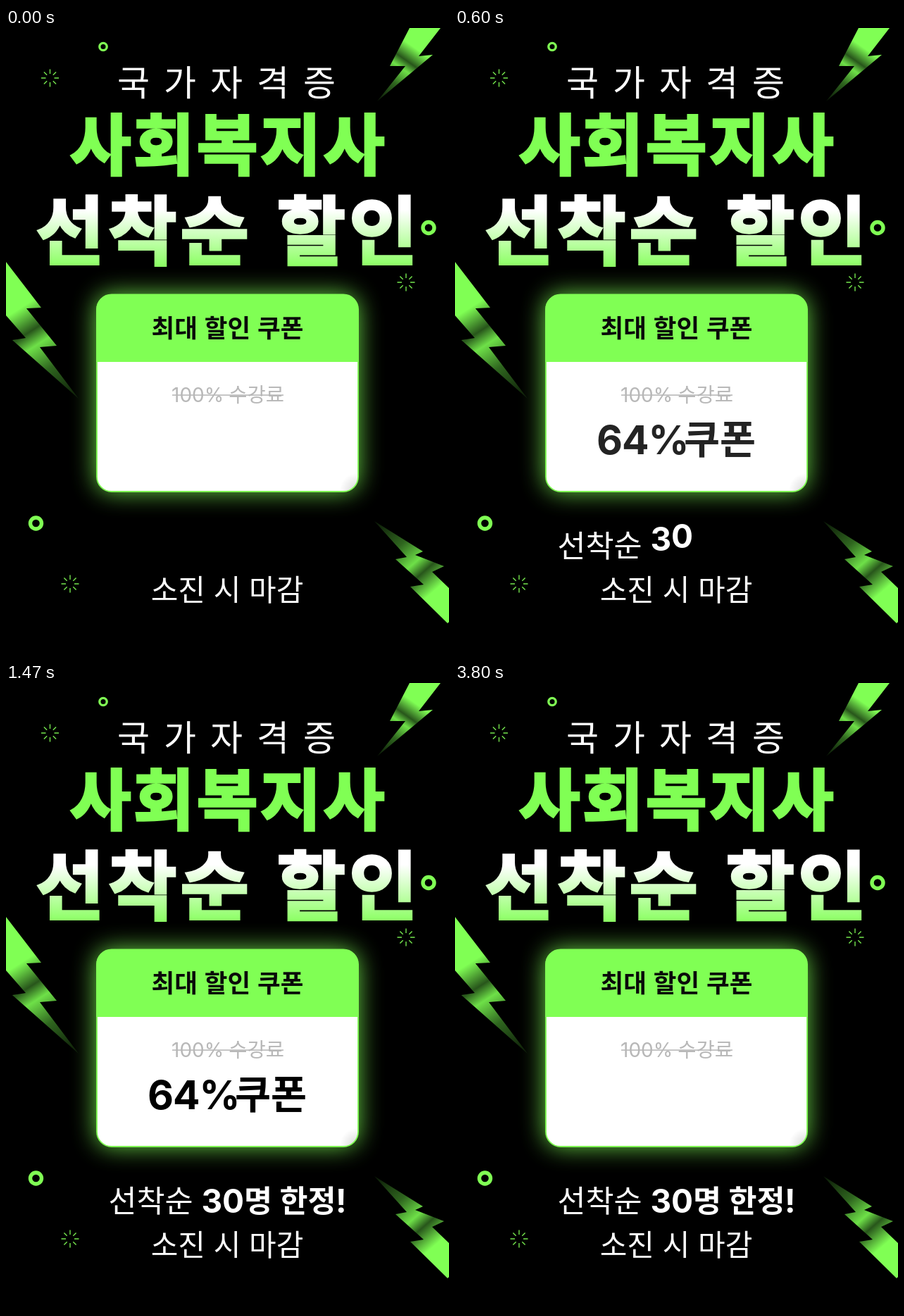
Recreate the animation shown at these times as an HTML page without scripts. Size 629 px wide and 890 px high, loop 5.01 s.

```html
<!DOCTYPE html>
<html lang="ko">
<head>
<meta charset="utf-8">
<title>할인 쿠폰</title>
<style>
  html, body { margin: 0; width: 100%; height: 100%; overflow: hidden; background: #000; }
  svg { position: absolute; left: 0; top: 0; width: 629px; height: 890px; overflow: hidden; }
  text { font-family: "Noto Sans CJK KR", "Noto Sans CJK", sans-serif; }
  .num { font-family: Inter, sans-serif; }
  .mid { text-anchor: middle; }
  .bold { font-weight: 700; }
  .title { font-weight: 900; stroke-width: 3.5; stroke-linejoin: miter; }
  .ring { fill: none; stroke: #80ff54; }

  .spin { transform-origin: 315px 583px; animation: spin 5.01s infinite, fade 5.01s linear infinite; }
  .promo { animation: reveal 5.01s step-end infinite; }
  .promo text { fill: #fff; font-size: 43.5px; animation: drop 5.01s calc(30ms + var(--i) * 100ms) infinite; }
  .promo .num { font-size: 46px; }

  @keyframes spin {
    0%, .6% { transform: rotate(-90deg) scale(5); animation-timing-function: cubic-bezier(.16, 1, .3, 1); }
    12.4%, 100% { transform: none; }
  }
  @keyframes fade {
    0%, .6% { opacity: 0; }
    13.77%, 69.86% { opacity: 1; }
    75.84%, 100% { opacity: 0; }
  }
  @keyframes drop {
    0% { transform: translateY(-15px); animation-timing-function: ease-in-out; }
    8.58%, 100% { transform: none; }
  }
  /* uncovers one more letter at each step */
  @keyframes reveal {
    0% { clip-path: inset(0 629px 0 0); }
    .59% { clip-path: inset(0 443px 0 0); }
    2.59% { clip-path: inset(0 403px 0 0); }
    4.59% { clip-path: inset(0 361px 0 0); }
    8.58% { clip-path: inset(0 322px 0 0); }
    10.57% { clip-path: inset(0 291px 0 0); }
    12.57% { clip-path: inset(0 247px 0 0); }
    16.56% { clip-path: inset(0 200px 0 0); }
    18.56% { clip-path: inset(0 160px 0 0); }
    20.55%, 100% { clip-path: inset(0 0 0 0); }
  }
</style>
</head>
<body>
<svg viewBox="0 0 629 890">
  <defs>
    <linearGradient id="shine" gradientUnits="userSpaceOnUse" x1="0" y1="258" x2="0" y2="338">
      <stop offset="0" stop-color="#fff"/>
      <stop offset="1" stop-color="#8cff64"/>
    </linearGradient>
    <linearGradient id="bolt">
      <stop offset="0" stop-color="#80ff54"/>
      <stop offset=".27" stop-color="#80ff54"/>
      <stop offset=".44" stop-color="#28561b"/>
      <stop offset=".54" stop-color="#6ee048"/>
      <stop offset=".72" stop-color="#2f661f"/>
      <stop offset="1" stop-color="#0a1606"/>
    </linearGradient>
    <linearGradient id="boltTop" href="#bolt" gradientUnits="userSpaceOnUse" x1="600" y1="0" x2="527" y2="104"/>
    <linearGradient id="boltLeft" href="#bolt" gradientUnits="userSpaceOnUse" x1="-10" y1="350" x2="103" y2="526"/>
    <linearGradient id="boltLow" href="#bolt" gradientUnits="userSpaceOnUse" x1="640" y1="835" x2="523" y2="700"/>
    <radialGradient id="corner" gradientUnits="userSpaceOnUse" cx="498" cy="656" r="24">
      <stop offset="0" stop-color="#d8d8d8"/>
      <stop offset="1" stop-color="#fff"/>
    </radialGradient>
    <filter id="glow" x="-30%" y="-30%" width="160%" height="160%">
      <feGaussianBlur stdDeviation="17"/>
    </filter>
    <path id="spark" d="M0-6V-12.5M0 6V12.5M-6 0H-12.5M6 0H12.5M4.3-4.3 8.6-8.6M-4.3-4.3-8.6-8.6M4.3 4.3 8.6 8.6M-4.3 4.3-8.6 8.6" stroke="#74e64d" stroke-width="1.4"/>
  </defs>

  <path fill="url(#boltTop)" d="M573 0H617L586 40 606 38 527 104 567 54 545 54Z"/>
  <path fill="url(#boltLeft)" d="M0 332 50 397 29 398 72 451 48 453 103 526 9 443 28 440 0 408Z"/>
  <path fill="url(#boltLow)" d="M523 700 592 743 581 748 622 764 605 772 629 795V843L627 845 574 793 593 790 553 754 569 751Z"/>

  <circle class="ring" cx="138" cy="26.5" r="5.2" stroke-width="3.3"/>
  <circle class="ring" cx="600" cy="283.5" r="8" stroke-width="5.4"/>
  <circle class="ring" cx="42.5" cy="703" r="8" stroke-width="5.4"/>
  <use href="#spark" x="62.5" y="71"/>
  <use href="#spark" x="568" y="361"/>
  <use href="#spark" x="91" y="789"/>

  <text x="158" y="96" font-size="50" font-weight="500" letter-spacing="20" fill="#fff">국가자격증</text>
  <text class="title mid" x="316" y="201" font-size="94" letter-spacing="3.5" fill="#80ff54" stroke="#80ff54">사회복지사</text>
  <text class="title mid" x="316" y="327" font-size="106" letter-spacing="5" fill="url(#shine)" stroke="url(#shine)">선착순 할인</text>

  <rect x="128" y="378" width="372" height="280" rx="22" fill="#80ff54" opacity=".85" filter="url(#glow)"/>
  <rect x="129" y="378.5" width="371" height="279.5" rx="21" fill="url(#corner)" stroke="#80ff54" stroke-width="1.8"/>
  <path fill="#80ff54" d="M128.2 474V399.5a21.5 21.5 0 0 1 21.5-21.5H479a21.5 21.5 0 0 1 21.5 21.5V474Z"/>
  <text class="mid" x="314.5" y="439" font-size="35.5" font-weight="600" fill="#0a0a0a">최대 할인 쿠폰</text>

  <g fill="#b8b8b8">
    <text class="num" x="235" y="531" font-size="28">100%</text>
    <text x="395" y="531" font-size="28.5" text-anchor="end">수강료</text>
    <rect x="236" y="520.3" width="158" height="1.6"/>
  </g>

  <g class="spin bold">
    <text class="num" x="201" y="605" font-size="57" letter-spacing="-1">64%</text>
    <text x="325" y="604" font-size="55.5">쿠폰</text>
  </g>

  <text class="mid" x="314" y="813" font-size="42" fill="#fff">소진 시 마감</text>
</svg>

<svg class="promo" viewBox="0 0 629 890">
  <text style="--i:0" x="145.5" y="751">선</text>
  <text style="--i:1" x="185.5" y="751">착</text>
  <text style="--i:2" x="225.5" y="751">순</text>
  <g class="bold">
    <text style="--i:4" class="num" x="277.5" y="752">3</text>
    <text style="--i:5" class="num" x="307" y="752">0</text>
    <text style="--i:6" x="338" y="751">명</text>
    <text style="--i:8" x="388.5" y="751">한</text>
    <text style="--i:9" x="428.5" y="751">정</text>
    <text style="--i:10" class="num" x="468" y="752">!</text>
  </g>
</svg>
</body>
</html>
```
